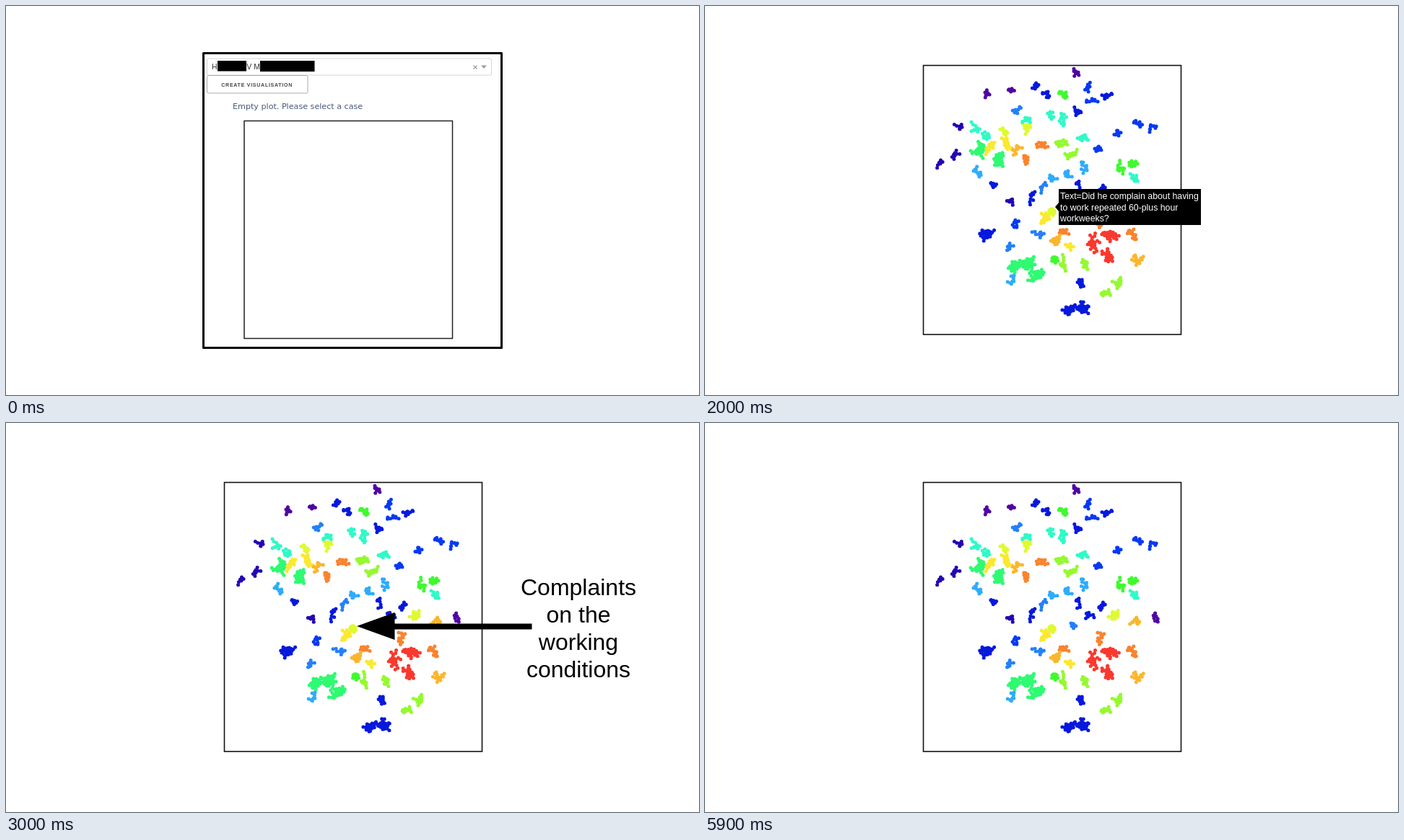
An HTML page that plays this animation: 960 by 540 pixels, repeating every 6500 ms.

```html
<!DOCTYPE html>
<html lang="en">
<head>
<meta charset="utf-8">
<title>Case question clusters</title>
<style>
  html, body { margin: 0; width: 100%; height: 100%; overflow: hidden; background: #fff; }
  svg { display: block; width: 100%; height: 100%; }
  text { font-family: "Liberation Sans", Arial, sans-serif; }
  .plot { font: 11.15px "DejaVu Sans", Verdana, sans-serif; fill: #465878; }
  .field { font-size: 10.5px; fill: #333; }
  .button { font-size: 7px; font-weight: bold; letter-spacing: .75px; fill: #444; }
  .tip { font-size: 12.3px; fill: #fff; }
  .label { font-size: 32px; }
  .dots path { fill: none; stroke-linecap: round; }
</style>
</head>
<body>
<svg viewBox="0 0 960 540">
  <g data-steps="0 1">
    <rect x="273.5" y="65.5" width="413" height="409" fill="none" stroke="#000" stroke-width="3" stroke-linejoin="round"/>
    <rect x="278.5" y="73" width="394" height="23" rx="2" fill="#fff" stroke="#d4d4d4"/>
    <text class="field" x="285" y="88">H</text>
    <text class="field" x="333.3" y="88">V M</text>
    <path d="M293 76h40v14.5h-40zM352 76h75.5v15h-75.5z"/>
    <path d="M647.5 82.5l5 5m0-5l-5 5" stroke="#999" stroke-width="1.1"/>
    <path d="M658 82.5h8l-4 4.2z" fill="#999"/>
    <rect x="278.5" y="96.5" width="139.5" height="24.5" rx="2" fill="#fff" stroke="#aaa"/>
    <text class="button" x="298.3" y="112">CREATE VISUALISATION</text>
    <rect x="330" y="159.5" width="288.5" height="302" fill="none" stroke="#222" stroke-width="1.5"/>
  </g>
  <text class="plot" data-steps="0" x="314" y="143">Empty plot. Please select a case</text>
  <g data-steps="1">
    <text class="plot" x="297.7" y="141">Visualising the questions from the case H</text>
    <text class="plot" x="578" y="141">V M</text>
    <path d="M529.5 129h44.5v14h-44.5zM600 128h75v16h-75z"/>
    <g class="dots" id="small"></g>
  </g>
  <g data-steps="2 3 4 5">
    <rect x="302.5" y="82.5" width="357" height="373.5" fill="none" stroke="#111" stroke-width="1.6"/>
    <g class="dots" id="large"></g>
  </g>
  <g data-steps="2">
    <path d="M485 279l5-6v-19h197v50h-197v-19z"/>
    <text class="tip" x="492" y="267.7">Text=Did he complain about having</text>
    <text class="tip" x="492" y="283.5">to work repeated 60-plus hour</text>
    <text class="tip" x="492" y="299.3">workweeks?</text>
  </g>
  <g data-steps="3">
    <path d="M486 282l52.5-19v15.5h190v8h-190v14.5z"/>
    <g class="label" text-anchor="middle">
      <text x="793" y="239">Complaints</text>
      <text x="793" y="277">on the</text>
      <text x="793" y="315">working</text>
      <text x="793" y="353">conditions</text>
    </g>
  </g>
  <g data-steps="4">
    <path d="M588 219.8L640 200V215.5L736 214.5V222L640 223.5V238z"/>
    <text class="label" x="754.4" y="228">Email</text>
  </g>
</svg>
<script>
  // Cluster centres by hue; the dots grow around them.
  const clumps = {
    268: '517,92 388,120 427,117 622,271',
    250: '353,171 422,272 326,219 346,208',
    235: '460,112 475,119 517,149 560,124 398,249 451,268 518,248 551,253 530,268 521,383',
    227: '533,112 540,130 598,163 616,175 573,180 540,198 428,306',
    214: '430,144 422,337 466,318 469,248 508,282',
    203: '503,229 524,232 484,240 372,229 426,382',
    165: '376,170 390,181 450,156 480,157 497,156 524,183 596,243',
    115: '501,126 481,350 575,225 591,219',
    90: '496,357 522,356 556,399 572,384 493,188 506,205',
    68: '415,176 443,168 572,265 484,284',
    55: '394,192 415,193 473,297 503,333',
    40: '431,205 486,327 595,274 595,354',
    25: '447,210 462,195 499,314 550,298 587,312'
  };
  const clouds = {
    235: '392,316 510,420 521,418',
    140: '379,201 406,217 428,362 442,355 457,359 464,373',
    3: '537,329 560,323 556,345'
  };

  function seeded(seed) {
    return () => (seed = seed * 16807 % 2147483647) / 2147483647;
  }

  // Every new dot settles beside one that is already there.
  function grow(center, count, random) {
    const dots = [center.split(',').map(Number)];
    while (dots.length < count) {
      const [x, y] = dots[Math.floor(random() * dots.length)];
      const angle = random() * 2 * Math.PI;
      dots.push([x + 4 * Math.cos(angle), y + 4 * Math.sin(angle)]);
    }
    return dots;
  }

  const random = seeded(4217);
  const layers = [
    [clouds, () => 34],
    [clumps, hue => Math.round(16 - hue / 32)]
  ].flatMap(([groups, count]) => Object.entries(groups).map(([hue, centers]) => ({
    color: `hsl(${hue} 95% ${Math.max(33, 58 - Math.max(0, hue - 210) * .55)}%)`,
    dots: centers.split(' ').flatMap(c => grow(c, count(hue), random))
  })));

  function plot(id, size, toX, toY) {
    document.getElementById(id).innerHTML = layers.map(({ color, dots }) => {
      const d = dots.map(([x, y]) => `M${toX(x).toFixed(1)} ${toY(y).toFixed(1)}h.01`).join('');
      return `<path d="${d}" stroke="${color}" stroke-width="${size}"/>`;
    }).join('');
  }

  plot('large', 5, x => x, y => y);
  plot('small', 4.7, x => 101.1 + .782 * x, y => 88.9 + .806 * y);

  const scenes = [...document.querySelectorAll('[data-steps]')]
    .map(el => ({ el, steps: el.dataset.steps.split(' ').map(Number) }));

  function draw(ms) {
    const step = Math.min(5, Math.floor(ms % 6500 / 1000));
    for (const { el, steps } of scenes) el.style.display = steps.includes(step) ? '' : 'none';
  }

  const start = performance.now();
  function tick() {
    draw(performance.now() - start);
    requestAnimationFrame(tick);
  }
  tick();
</script>
</body>
</html>
```
